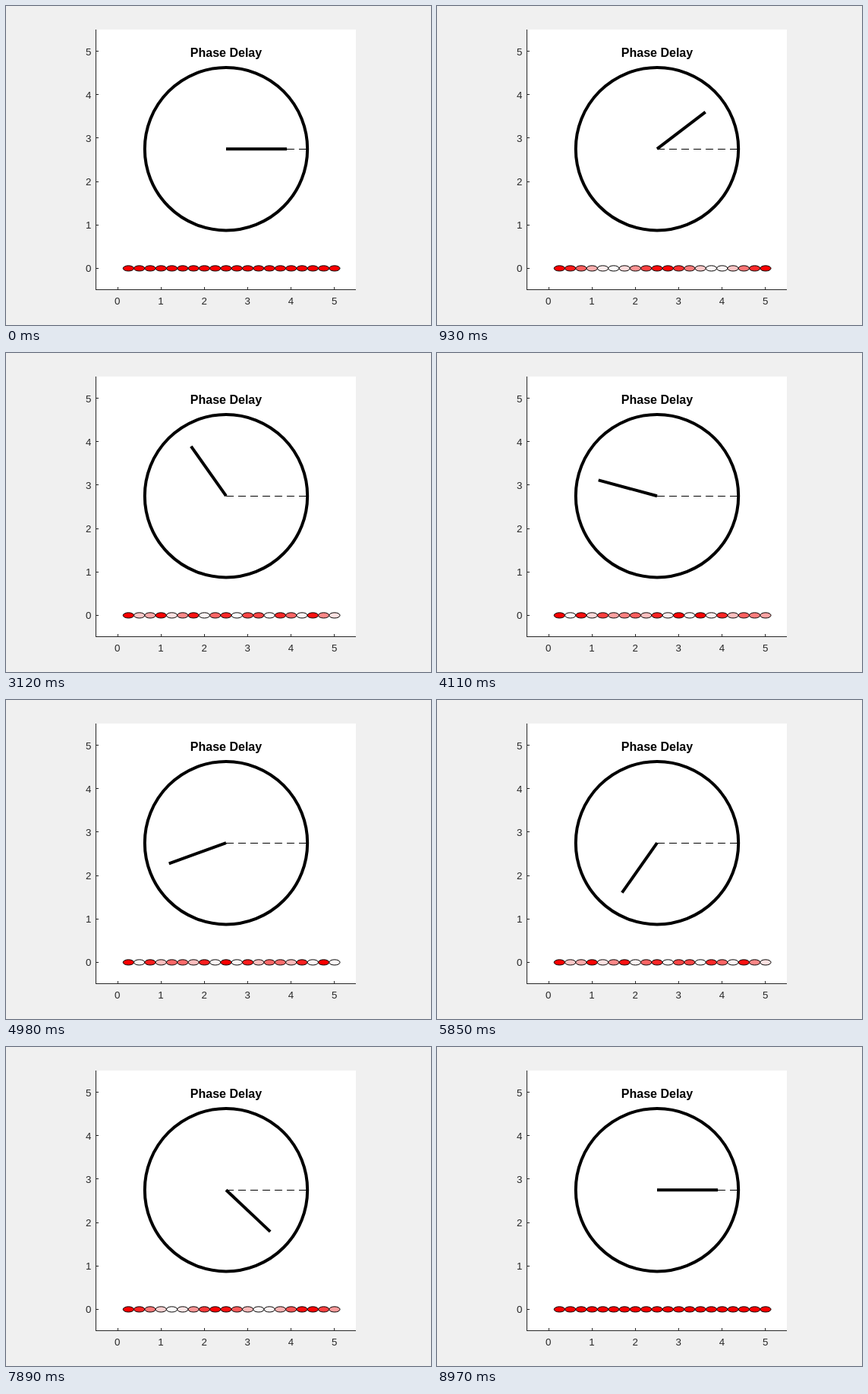
These frames come from a looping animation (560x420 px, 9000 ms). An HTML page:

```html
<!DOCTYPE html>
<html lang="en">
<head>
<meta charset="utf-8">
<title>Phase Delay</title>
<style>
  html, body { margin: 0; width: 100%; height: 100%; overflow: hidden; background: #f0f0f0; }
  svg { display: block; width: 560px; height: 420px; }
  text { font-family: "Liberation Sans", Arial, sans-serif; font-size: 13.33px; fill: #262626; }
  .title { font-size: 16px; font-weight: bold; fill: #000; text-anchor: middle; }
</style>
</head>
<body>
<svg id="stage" viewBox="0 0 560 420"></svg>
<script>
const FRAME_MS = 30, FRAMES = 300, DISCS = 20;
const UNIT = 343 / 6;
const px = x => 118.5 + (x + 0.5) * UNIT;
const py = y => 31 + (5.5 - y) * UNIT;
const snap = v => Math.floor(v) + 0.5;
const stage = document.getElementById("stage");

function add(tag, attrs, text) {
  const node = document.createElementNS("http://www.w3.org/2000/svg", tag);
  for (const key in attrs) node.setAttribute(key, attrs[key]);
  if (text !== undefined) node.textContent = text;
  return stage.appendChild(node);
}

function addLine(x1, y1, x2, y2, stroke, width, extra) {
  return add("line", { x1, y1, x2, y2, stroke, "stroke-width": width, ...extra });
}

// Axes
add("rect", { width: 560, height: 420, fill: "#f0f0f0" });
add("rect", { x: 118, y: 31, width: 343, height: 343, fill: "#fff" });
addLine(118.5, 31, 118.5, 374, "#262626", 1);
addLine(118, 373.5, 461, 373.5, "#262626", 1);
for (let n = 0; n <= 5; n++) {
  const x = snap(px(n)), y = snap(py(n));
  addLine(x, 370, x, 374, "#262626", 1);
  addLine(118, y, 122, y, "#262626", 1);
  add("text", { x: px(n) - 0.3, y: 393, "text-anchor": "middle" }, n);
  add("text", { x: 112.5, y: Math.round(py(n)) + 5, "text-anchor": "end" }, n);
}
add("text", { x: 290, y: 67, class: "title" }, "Phase Delay");

// Dial
const cx = px(2.5), cy = py(2.75), radius = 1.875 * UNIT, handLength = 1.4 * UNIT;
add("circle", { cx, cy, r: radius, fill: "none", stroke: "#000", "stroke-width": 4 });
addLine(cx, 188.5, cx + radius, 188.5, "#000", 1, { "stroke-dasharray": "10 6" });
const hand = addLine(cx, cy, cx + handLength, cy, "#000", 4);

// Row of discs, each delayed by one more phase step
const discs = Array.from({ length: DISCS }, (_, i) => add("ellipse", {
  cx: px((i + 1) / 4), cy: py(0), rx: UNIT / 8, ry: UNIT / 16,
  stroke: "#000", "stroke-width": 1
}));

function draw(ms) {
  const step = Math.floor(ms / FRAME_MS + 1e-6) % FRAMES;
  const phase = 2 * Math.PI * step / (FRAMES - 1);
  hand.setAttribute("x2", cx + handLength * Math.cos(phase));
  hand.setAttribute("y2", cy - handLength * Math.sin(phase));
  discs.forEach((disc, i) => {
    const pale = Math.round(255 * (1 - Math.cos(i * phase)) / 2);
    disc.setAttribute("fill", `rgb(255,${pale},${pale})`);
  });
}

const start = performance.now();
function tick() {
  draw(performance.now() - start);
  requestAnimationFrame(tick);
}
draw(0);
requestAnimationFrame(tick);
</script>
</body>
</html>
```
